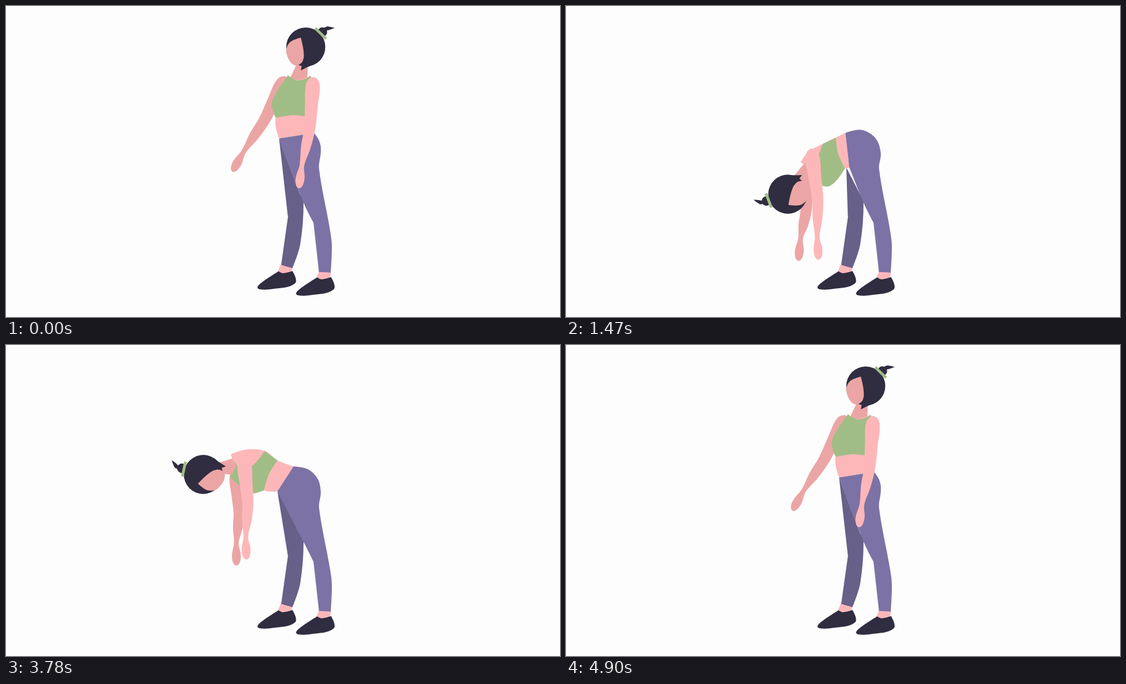
An HTML page with a canvas for the animation above (4970 ms loop, 998 px wide and 561 px high).

```html
<!DOCTYPE html>
<html lang="en">
<head>
<meta charset="utf-8">
<title>Forward bend</title>
<style>
html, body { margin: 0; width: 100%; height: 100%; overflow: hidden; background: #fdfdfd; }
canvas { display: block; width: 998px; height: 561px; }
</style>
</head>
<body>
<canvas id="stage" width="998" height="561"></canvas>
<script>
const ctx = document.getElementById('stage').getContext('2d');

const COLOR = {
  bg: '#fdfdfd', skin: '#fdb7b9', shade: '#eca5a5', top: '#a1bd86',
  leg: '#7d72a5', farLeg: '#676089', dark: '#302d41'
};

// Key poses: stand, lean, flat back, low, down.
const KEYS = [0, 7, 16, 23, 24];
const LAST = 24, TICK = 70, TICKS = 71;

// The joints that move, one place per key pose.
const RIG = {
  head: [[540, 74], [428, 108.5], [355.5, 233.5], [427, 384], [459.5, 403.5]],
  turn: [[0], [-64], [-122], [-168], [-169]],
  farShoulder: [[499, 138], [457, 165], [415, 236], [446, 345], [467, 360]],
  farWrist: [[428, 263], [425, 302], [415, 357], [431, 447], [457, 466]],
  shoulder: [[553, 140], [500, 140], [429, 212], [455, 296], [470, 324]],
  wrist: [[533, 288], [481, 291], [432, 346], [471, 449], [514, 470]],
  strap: [[549, 126], [488, 128], [405, 197], [437, 320], [457, 346]],
  farStrap: [[508, 125], [454, 150], [403, 238], [468, 350], [497, 378]],
  back: [[550, 165], [527, 168], [466, 191], [463, 276], [461, 294]],
  hemBack: [[545, 200], [528, 198], [489, 208], [484, 252], [474, 265]],
  hemFront: [[486, 202], [473, 221], [465, 262], [520, 302], [526, 288]],
  bust: [[479, 173], [450, 190], [441, 267], [494, 346], [521, 340]],
  waistBack: [[555, 229], [539, 218], [518, 219], [499, 232], [505, 225]],
  waistFront: [[492, 239], [497, 243], [489, 264], [521, 300], [526, 288]]
};

const HIP = [525, 265];

const add = (p, q, k = 1) => [p[0] + q[0] * k, p[1] + q[1] * k];
const mix = (p, q, u) => p.map((v, i) => v + (q[i] - v) * u);
const unit = (p, q) => {
  const d = Math.hypot(q[0] - p[0], q[1] - p[1]) || 1;
  return [(q[0] - p[0]) / d, (q[1] - p[1]) / d];
};
const side = ([x, y]) => [y, -x];
const toward = (p, q, d) => add(p, unit(p, q), d);

// Smooth curve through the key places of one joint.
function place(rows, step) {
  let i = 0;
  while (i < KEYS.length - 2 && step > KEYS[i + 1]) i++;
  const span = KEYS[i + 1] - KEYS[i], u = (step - KEYS[i]) / span;
  const slope = (n, j) => {
    const a = Math.max(0, n - 1), b = Math.min(KEYS.length - 1, n + 1);
    return (rows[b][j] - rows[a][j]) / (KEYS[b] - KEYS[a]);
  };
  return rows[i].map((p, j) => {
    const d = rows[i + 1][j] - p, m = slope(i, j) * span, n = slope(i + 1, j) * span;
    return p + u * (m + u * (3 * d - 2 * m - n + u * (m + n - 2 * d)));
  });
}

// Closed curve; a "c" in marks makes that point a corner.
function blob(points, color, marks = '') {
  const n = points.length;
  const at = i => points[(i + n) % n];
  const tangent = i => marks[i % n] === 'c' ? [0, 0] : unit(at(i - 1), at(i + 1));
  ctx.beginPath();
  ctx.moveTo(...at(0));
  for (let i = 0; i < n; i++) {
    const p = at(i), q = at(i + 1), r = Math.hypot(q[0] - p[0], q[1] - p[1]) / 3;
    ctx.bezierCurveTo(...add(p, tangent(i), r), ...add(q, tangent(i + 1), -r), ...q);
  }
  ctx.fillStyle = color;
  ctx.fill();
}

// Outline around a chain of [point, half width], with round ends.
function limb(chain, end, color) {
  const left = [], right = [];
  chain.forEach(([p, w], i) => {
    const a = chain[Math.max(0, i - 1)][0], b = i + 1 < chain.length ? chain[i + 1][0] : end;
    const n = side(unit(a, b));
    left.push(add(p, n, w));
    right.unshift(add(p, n, -w));
  });
  const [first, w] = chain[0];
  blob([toward(first, chain[1][0], -w), ...left, end, ...right], color);
}

function arm(shoulder, wrist, color) {
  const tip = add(wrist, unit(shoulder, wrist), 41);
  const elbow = add(mix(shoulder, wrist, .55), [5, 0]);
  limb([
    [shoulder, 12], [mix(shoulder, elbow, .5), 11.5], [elbow, 10], [mix(elbow, wrist, .5), 8.7],
    [wrist, 4.2], [mix(wrist, tip, .5), 7.8], [mix(wrist, tip, .85), 6.3]
  ], tip, color);
}

function disc(x, y, r, color) {
  ctx.beginPath();
  ctx.arc(x, y, r, 0, Math.PI * 2);
  ctx.fillStyle = color;
  ctx.fill();
}

function head([x, y], [turn]) {
  ctx.save();
  ctx.translate(x, y);
  ctx.rotate(turn * Math.PI / 180);
  disc(0, 0, 35.2, COLOR.dark);
  blob([[-9, -17], [-29, -8], [-35, 10], [-20, 33], [-4, 22]], COLOR.shade, 'c');
  blob([[-4, 20], [-9, 42], [16, 30]], COLOR.dark, 'ccc');
  disc(30, -27, 8.5, COLOR.dark);
  blob([[32, -33], [38, -37], [52, -34.5], [38, -30]], COLOR.dark, 'cscs');
  ctx.strokeStyle = COLOR.top;
  ctx.lineWidth = 5;
  ctx.beginPath();
  ctx.moveTo(17, -34);
  ctx.lineTo(36.5, -15);
  ctx.stroke();
  ctx.restore();
}

function foot(dx, dy) {
  ctx.save();
  ctx.translate(dx, dy);
  blob([[495, 466], [516, 470], [513, 484], [488, 484]], COLOR.skin, 'cccc');
  blob([[453, 507], [463, 497], [491, 478.5], [499, 482], [516, 478], [521, 500], [480, 510.5], [457, 511]],
    COLOR.dark, 'sscscsss');
  ctx.restore();
}

function legs(front, back) {
  foot(0, 0);
  foot(69.5, 11);
  blob([[530, 340], [Math.min(front[0], 505), front[1]], [508, 380], [496, 467], [516, 473], [530, 430], [536, 355]],
    COLOR.farLeg, 'cccccss');
}

function nearLeg(front, back) {
  // The seat is an arc around the hip.
  const a = Math.atan2(back[1] - HIP[1], back[0] - HIP[0]);
  const r = Math.hypot(back[0] - HIP[0], back[1] - HIP[1]);
  const seat = [0, 1 / 3, 2 / 3, 1].map(u => {
    const t = a * (1 - u), d = r + (42 - r) * u;
    return [HIP[0] + Math.cos(t) * d, HIP[1] + Math.sin(t) * d];
  });
  blob([front, ...seat, [564, 294], [583, 400], [587, 432], [585, 481], [564, 480], [554, 391], [537, 357]],
    COLOR.leg, 'ccsssssscccs');
}

function draw(step) {
  const j = {};
  for (const name in RIG) j[name] = place(RIG[name], step);
  const hem = mix(j.hemBack, j.hemFront, .5);
  const neckline = toward(mix(j.strap, j.farStrap, .5), hem, 9);
  const armhole = mix(j.shoulder, j.wrist, .1);
  const upperBack = toward(mix(j.strap, j.back, .5), j.hemFront, -6);

  ctx.fillStyle = COLOR.bg;
  ctx.fillRect(0, 0, 998, 561);
  arm(j.farShoulder, j.farWrist, COLOR.shade);
  legs(j.waistFront);

  const turn = j.turn[0] * Math.PI / 180, c = Math.cos(turn), s = Math.sin(turn);
  const nape = add(j.head, [-6 * c - 32 * s, 32 * c - 6 * s]);
  const n = side(unit(nape, neckline));
  blob([add(nape, n, 10), add(neckline, n, 16), add(neckline, n, -16), add(nape, n, -10)], COLOR.shade, 'cccc');
  head(j.head, j.turn);

  blob([j.strap, upperBack, j.back, j.hemBack, j.waistBack, j.waistFront, j.hemFront, neckline],
    COLOR.skin, 'csssccsc');
  blob([j.farStrap, neckline, j.strap, armhole, j.back, j.hemBack, toward(hem, neckline, 4), j.hemFront, j.bust],
    COLOR.top, 'cscsccscs');
  nearLeg(j.waistFront, j.waistBack);
  arm(j.shoulder, j.wrist, COLOR.skin);
}

function frame(time) {
  const i = Math.floor(Math.max(0, time - start) / TICK) % TICKS;
  draw(Math.min(i, LAST, TICKS - 1 - i));
  requestAnimationFrame(frame);
}

const start = performance.now();
draw(0);
requestAnimationFrame(frame);
</script>
</body>
</html>
```
